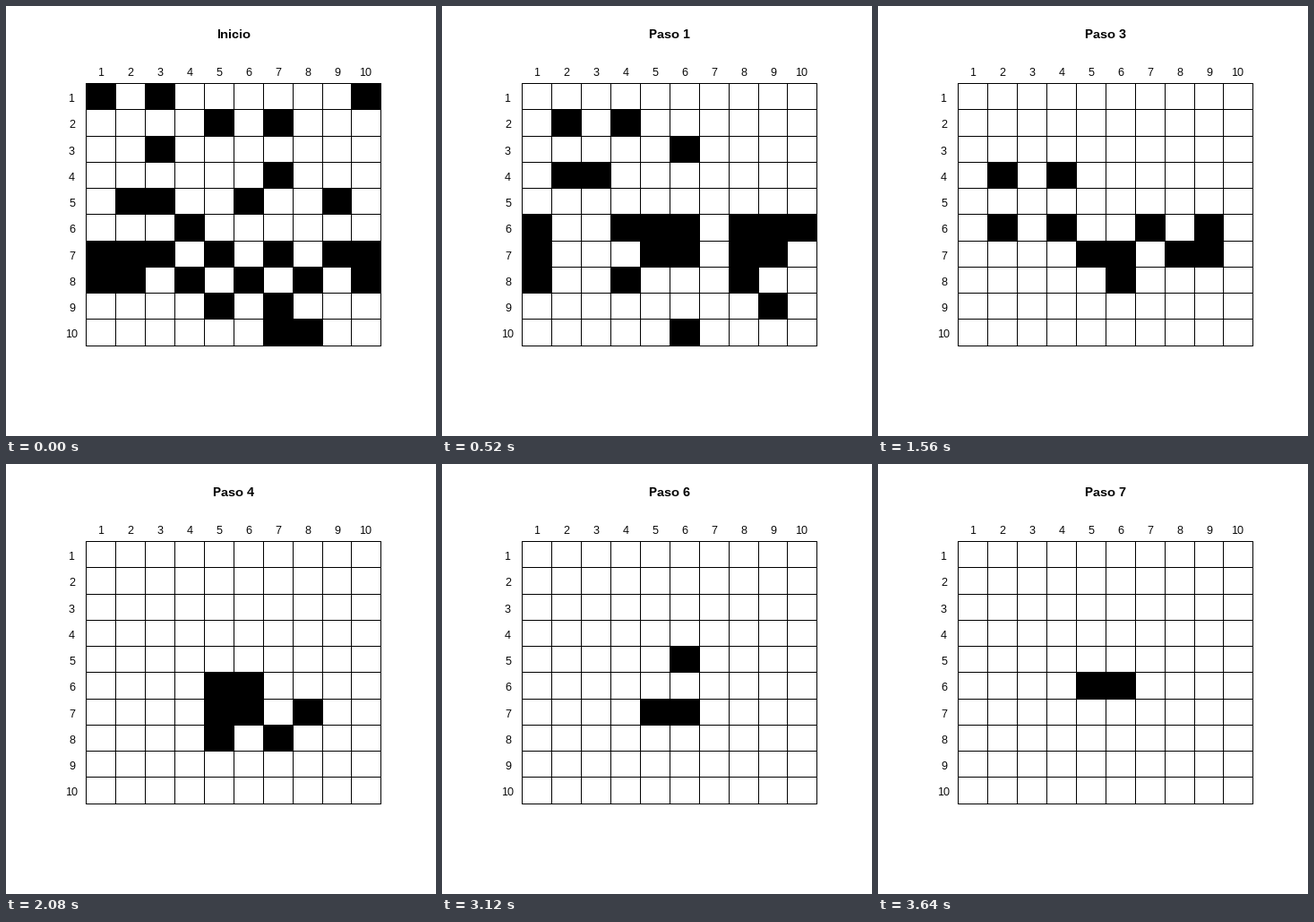
Write a matplotlib script that moves like this. It is 480x480 px and loops after 4160 ms.

```python
import math

import matplotlib.pyplot as plt
import numpy as np
from matplotlib.animation import FuncAnimation
from matplotlib.patches import Rectangle

SIZE, DPI = 480, 80
N = 10
STEPS = 8
CELL_W, CELL_H = 32.889, 29.252
CX, CY = 254.4, 232.8
START = [(1, 3, 10), (5, 7), (3,), (7,), (2, 3, 6, 9), (4,),
         (1, 2, 3, 5, 7, 9, 10), (1, 2, 4, 6, 8, 10), (5, 7), (7, 8)]

plt.rcParams.update({"font.family": "Liberation Sans",
                     "text.hinting": "native", "text.hinting_factor": 1})


def next_step(grid):
    """A cell is alive next when exactly three neighbours are alive."""
    p = np.pad(grid, 1)
    near = sum(p[i:i + N, j:j + N] for i in range(3) for j in range(3)) - grid
    return (near == 3).astype(int)


first = np.zeros((N, N), int)
for row, cols in enumerate(START):
    for col in cols:
        first[row, col - 1] = 1
history = [first]
while len(history) < STEPS:
    history.append(next_step(history[-1]))

fig = plt.figure(figsize=(SIZE / DPI, SIZE / DPI), dpi=DPI, facecolor="white")
ax = fig.add_axes([0, 0, 1, 1])
ax.set_xlim(0, SIZE)
ax.set_ylim(SIZE, 0)
ax.axis("off")


def box(x, y, w, h):
    patch = Rectangle((x, y), w, h, facecolor="black", linewidth=0,
                      antialiased=False)
    return ax.add_patch(patch)


def label(x, y, text, px, weight="normal"):
    return ax.text(x, y, text, fontsize=px * 72 / DPI, weight=weight,
                   color="black", ha="center", va="baseline")


def col_x(c):
    return CX + (c - N / 2) * CELL_W


def row_y(r):
    return CY + (r - N / 2) * CELL_H


xs = [math.floor(col_x(i)) for i in range(N + 1)]
ys = [math.floor(row_y(i)) for i in range(N + 1)]

for x in xs:
    box(x, ys[0], 1, ys[-1] - ys[0] + 1)
for y in ys:
    box(xs[0], y, xs[-1] - xs[0] + 1, 1)

for i in range(N):
    label(col_x(i + 0.5), round(row_y(-0.5) + 6), str(i + 1), 12)
    label(col_x(-0.5), round(row_y(i + 0.5) + 6), str(i + 1), 12)

title = label(CX, 36, "", 14.4, "bold")
cells = [[box(xs[c], ys[r], xs[c + 1] - xs[c], ys[r + 1] - ys[r])
          for c in range(N)] for r in range(N)]


def draw(step):
    title.set_text(f"Paso {step}" if step else "Inicio")
    for r in range(N):
        for c in range(N):
            cells[r][c].set_visible(bool(history[step][r, c]))


anim = FuncAnimation(fig, draw, frames=STEPS, interval=520, repeat=True,
                     repeat_delay=0)
plt.show()
```
